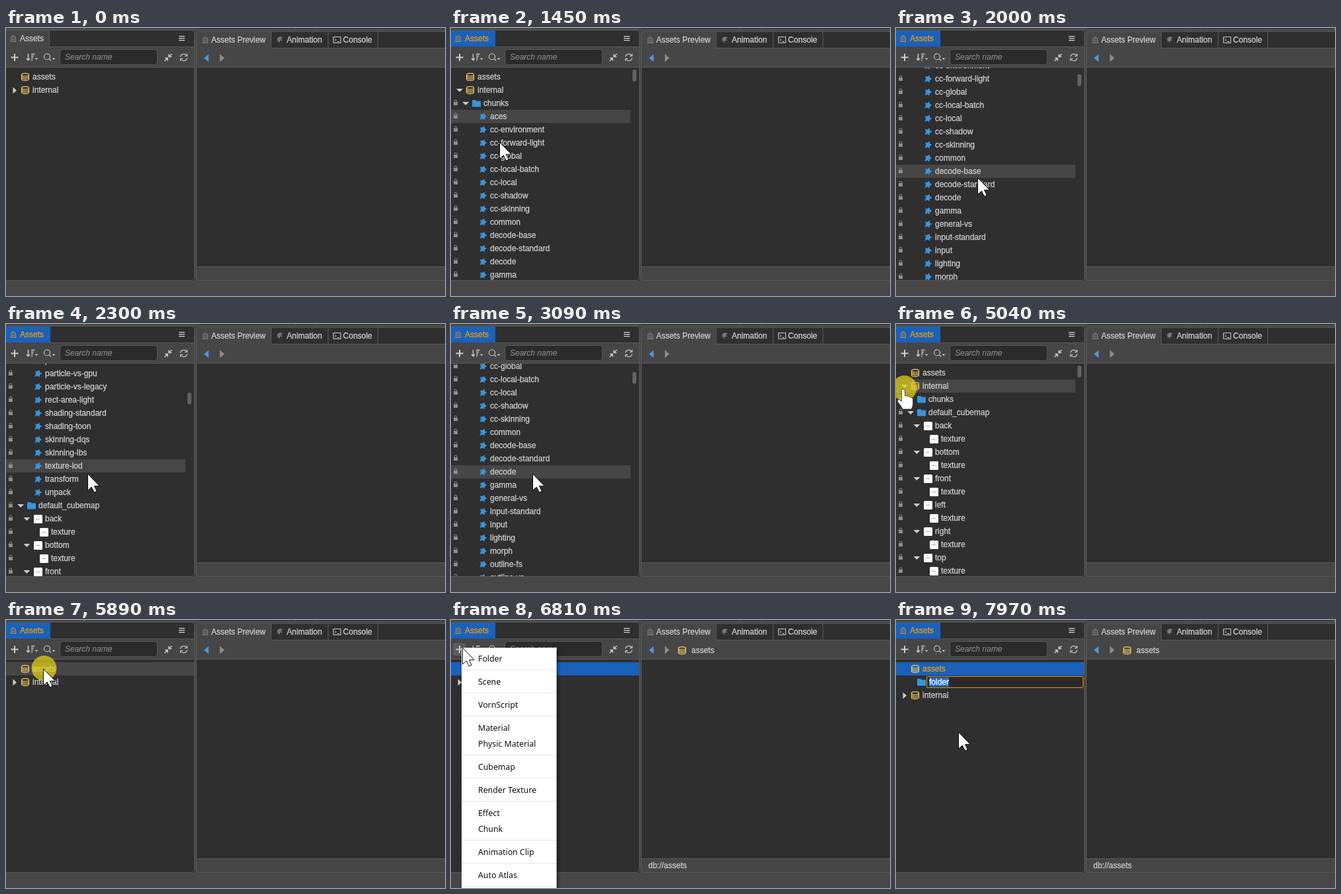
Animation of 663 by 406 pixels, one loop 8000 ms. Source, as an HTML page with a canvas:

```html
<!DOCTYPE html>
<html lang="en">
<head>
<meta charset="utf-8">
<title>Asset panel</title>
<style>
html, body { margin: 0; width: 100%; height: 100%; overflow: hidden; background: #474747; }
canvas { display: block; }
</style>
</head>
<body>
<canvas id="stage" width="663" height="406"></canvas>
<script>
const g = document.getElementById('stage').getContext('2d');
const UI = '12px "Liberation Sans", Arial, sans-serif';
const MENU = '12.3px "Noto Sans", sans-serif';
const DARK = '#2f2f2f', BAR = '#464646', EDGE = '#595959', TEXT = '#cccccc', DIM = '#858585';
const BLUE = '#1961ba', ORANGE = '#f49b0b', SKY = '#3794dc', GOLD = '#f0c85a';
const LOOP = 8000, STEP = 76.86, HOVER_LAG = 120, ROW = 20;

// Mouse presses: down and up, in ms. The effect of each follows on release.
const press = {
  expand: [1050, 1200], foldChunks: [3950, 4180], collapse: [5040, 5190],
  select: [5880, 6035], plus: [6730, 6800], folder: [7660, 7730]
};
const RENAME = 7880;
const after = (name, t) => t >= press[name][1];

// Moves: start, end, then the place reached.
const pointerMoves = [
  [0, 0, 245, 298], [130, 290, 26, 171], [400, 500, 30, 92], [510, 670, 18, 91], [820, 900, 14, 90],
  [1257, 1437, 73, 173], [1440, 1550, 123, 227], [3250, 3560, 18, 115], [4430, 4550, 11, 98],
  [5430, 5760, 56, 74], [6110, 6440, 17, 42], [7000, 7400, 70, 55], [7700, 7960, 94, 170]
];
const scrollMoves = [[0, 0, 0], [1930, 2530, 674], [2870, 3192, 0]];

const shaders = ('aces cc-environment cc-forward-light cc-global cc-local-batch cc-local cc-shadow cc-skinning ' +
  'common decode-base decode-standard decode gamma general-vs input-standard input lighting morph outline-fs ' +
  'outline-vs output-standard output packing particle-common particle-trail particle-vs-gpu particle-vs-legacy ' +
  'rect-area-light shading-standard shading-toon skinning-dqs skinning-lbs texture-lod transform unpack').split(' ');
const sides = ['back', 'bottom', 'front', 'left', 'right', 'top'];
const menuGroups = [['Folder'], ['Scene'], ['VornScript'], ['Material', 'Physic Material'], ['Cubemap'],
  ['Render Texture'], ['Effect', 'Chunk'], ['Animation Clip'], ['Auto Atlas']];

const within = (t, a, b) => t >= a && t < b;
const snap = t => 130 + Math.floor((t - 120) / STEP) * STEP;

function follow(moves, t) {
  let place = moves[0].slice(2);
  for (const [from, to, ...target] of moves) {
    if (t < from) break;
    const left = t < to ? (1 - (t - from) / (to - from)) ** 2 : 0;
    place = target.map((v, i) => v + (place[i] - v) * left);
  }
  return place;
}
const pointerAt = t => follow(pointerMoves, t);
const pointerShown = t => within(t, 130, 350) || t >= 505;

function box(x, y, w, h, color) {
  g.fillStyle = color;
  g.fillRect(x, y, w, h);
}
function round(x, y, w, h, r, fill, stroke) {
  g.beginPath();
  g.roundRect(x, y, w, h, r);
  if (fill) { g.fillStyle = fill; g.fill(); }
  if (stroke) { g.strokeStyle = stroke; g.lineWidth = 1; g.stroke(); }
}
function draw(x, y, d, fill, stroke, width = 1) {
  const path = new Path2D(d);
  g.save();
  g.translate(x, y);
  if (fill) { g.fillStyle = fill; g.fill(path); }
  if (stroke) { g.strokeStyle = stroke; g.lineWidth = width; g.stroke(path); }
  g.restore();
}
const trace = (x, y, d, color, width) => draw(x, y, d, null, color, width);

// A hairline stroke gives the panel text its slightly heavier weight.
function label(s, x, y, color = TEXT, font = UI, weight = 0.3) {
  g.font = font;
  g.fillStyle = g.strokeStyle = color;
  g.lineWidth = weight;
  g.fillText(s, x, y);
  if (weight) g.strokeText(s, x, y);
}

const icons = {
  db(x, y) {
    trace(x, y, 'M-5.5-3.2a5.5 2.2 0 1 0 11 0a5.5 2.2 0 1 0-11 0V3.4a5.5 2.2 0 0 0 11 0V-3.2' +
      'M-5.5-1a5.5 2.2 0 0 0 11 0M-5.5 1.2a5.5 2.2 0 0 0 11 0', GOLD, 1.1);
  },
  folder(x, y) {
    round(x - 6, y - 5, 6, 5, 1, SKY);
    round(x - 6, y - 3.5, 13, 9, 1, SKY);
  },
  shader(x, y) {
    g.beginPath();
    for (let i = 0; i < 10; i++) {
      const a = i * Math.PI / 5 - 1.25, r = i % 2 ? 3.3 : 5.8;
      g.lineTo(x + 0.5 + r * Math.cos(a), y + r * Math.sin(a));
    }
    g.fillStyle = SKY;
    g.fill();
    draw(x, y, 'M-2 1L-5 5.5L0 3Z', SKY);
  },
  image(x, y) {
    round(x - 6, y - 6, 13, 13, 1.5, '#fff');
    box(x - 3, y, 6, 1, '#aaa');
  },
  panel(x, y, color) {
    trace(x, y, 'M-2-4.5H2M-3.5-2.5H3.5V4.5H-3.5ZM-4.5 4.5H4.5M-1.2-1V3.5M1.2-1V3.5', color);
  },
  lock(x, y) {
    box(x - 3, y - 1, 6, 5, '#8e8e8e');
    trace(x, y, 'M-1.8-1V-2.2a1.8 1.8 0 0 1 3.6 0V-1', '#8e8e8e');
  }
};
const caretDown = (x, y, s = 5) => draw(x, y, `M${-s} ${-s / 2}H${s}L0 ${s / 2}Z`, TEXT);
const caretRight = (x, y) => draw(x, y, 'M-2.5-5L3 0L-2.5 5Z', TEXT);

function listRows(t) {
  const rows = [], add = (name, depth, icon, open, locked = true) => rows.push({ name, depth, icon, open, locked });
  const open = after('expand', t) && !after('collapse', t), chunksOpen = !after('foldChunks', t);
  add('assets', 0, 'db', undefined, false);
  if (t >= RENAME) add('folder', 1, 'folder', undefined, false);
  add('internal', 0, 'db', open, false);
  if (!open) return rows;
  add('chunks', 1, 'folder', chunksOpen);
  if (chunksOpen) shaders.forEach(s => add(s, 2, 'shader'));
  add('default_cubemap', 1, 'folder', true);
  for (const s of sides) {
    add(s, 2, 'image', true);
    add('texture', 3, 'image');
  }
  add('default_file_content', 1, 'folder', false);
  return rows;
}

function drawList(t) {
  const rows = listRows(t), [scroll] = follow(scrollMoves, t), scrollable = rows.length > 15;
  const lagged = t - HOVER_LAG, hovering = pointerShown(lagged) && t < press.plus[0];
  const hover = hovering ? Math.floor((pointerAt(lagged)[1] - 67 + scroll) / ROW) : -1;
  g.save();
  g.beginPath();
  g.rect(0, 60, 284, 322);
  g.clip();
  rows.forEach((row, i) => {
    const y = Math.round(74 + ROW * i - scroll), x = Math.round(40 + 9.3 * row.depth);
    const active = i === 0 && after('select', t);
    if (active) box(0, y - 10, 284, ROW, BLUE);
    else if (i === hover) box(0, y - 10, scrollable ? 271 : 284, ROW, BAR);
    if (row.locked) icons.lock(7, y - 1);
    if (row.open !== undefined) (row.open ? caretDown : caretRight)(13 + 9.2 * row.depth, y + 0.5);
    icons[row.icon](x - 11, y);
    if (row.name === 'folder') {
      round(46.5, y - 8.5, 236, 17, 1.5, '#2a2a2a', ORANGE);
      box(50, y - 7, 30, 14, '#1f6fd0');
      label('folder', 50, y + 4, '#fff');
    } else label(row.name, x, y + 4, active ? ORANGE : TEXT);
  });
  if (scrollable) round(274, 63 + scroll * 0.073, 6, 18, 3, '#626262');
  g.restore();
}

function drawLeft(t) {
  const focused = t >= press.expand[0];
  box(0, 3, 285, 380, DARK);
  box(0, 28, 284, 32, BAR);
  for (const y of [3, 28, 59]) box(0, y, 284, 1, EDGE);
  box(0, 4, 66, 25, BAR);
  box(65, 4, 1, 24, EDGE);
  if (focused) box(0, 4, 67, 24, BLUE);
  icons.panel(11, 16, focused ? '#bd8a45' : DIM);
  label('Assets', 21, 20, focused ? ORANGE : TEXT);
  for (let y = 12; y < 20; y += 3) box(261, y, 9, 1.3, TEXT);

  if (t >= press.plus[0] && !after('folder', t)) round(3, 35, 20, 19, 3, '#5c5c5c');
  trace(13, 44.5, 'M-5.5 0H5.5M0-5.5V5.5', TEXT, 2);
  trace(37, 44, 'M-3.5-5V4.5M-6 2L-3.5 5L-1 2M1-4.5H6.5M1-1.5H5M1 1.5H4M1 4.5H3', TEXT, 1.4);
  trace(62, 43.5, 'M-4.5 0a4.5 4.5 0 1 0 9 0a4.5 4.5 0 1 0-9 0M3.2 3.2L6 6', TEXT, 1.2);
  for (const x of [46, 72]) caretDown(x, 47, 2.5);
  round(81.5, 32.5, 147, 23, 4, '#2b2b2b', EDGE);
  label('Search name', 89, 48, DIM, 'italic ' + UI, 0.2);
  trace(245, 44.5, 'M5.5-5.5L1.5-1.5M1-5V-1H5M-5.5 5.5L-1.5 1.5M-1 5V1H-5', TEXT, 1.5);
  trace(268.5, 44.5, 'M-5-1A5 5 0 0 1 4-3M5-5.5V-2H1.5M5 1A5 5 0 0 1-4 3M-5 5.5V2H-1.5', TEXT, 1.2);
  drawList(t);
  round(-5.5, 3.5, 290, 379, 4, null, EDGE);
}

function drawRight(t) {
  box(288, 6, 375, 376, DARK);
  box(288, 6, 113, 25, BAR);
  box(288, 31, 375, 29, BAR);
  box(288, 361, 375, 21, BAR);
  box(401, 30, 262, 1, EDGE);
  for (const y of [59, 361]) box(288, y, 375, 1, EDGE);
  for (const x of [400, 486, 561]) box(x, 6, 1, 24, EDGE);
  round(287.5, 5.5, 390, 377, 4, null, EDGE);
  icons.panel(301, 18, DIM);
  label('Assets Preview', 310, 22);
  draw(413, 18, 'M-4-2L0-5L5-4L2-1L5 1H1L0 5L-2 1L-4 4L-3 0Z', '#777');
  label('Animation', 424, 22);
  trace(500, 18, 'M-5.5-4.5H5.5V4.5H-5.5ZM-3.5-2L-1.5 0L-3.5 2M0 2.5H3.5', TEXT);
  label('Console', 509, 22);
  draw(303, 45.5, 'M3-6L-4 0L3 6Z', '#4a96df');
  draw(326, 45.5, 'M-3-6L4 0L-3 6Z', '#8a8a8a');
  if (after('select', t)) {
    icons.db(349, 46);
    label('assets', 363, 50);
    label('db://assets', 298, 376);
  }
}

function drawMenu(t) {
  if (!after('plus', t) || after('folder', t)) return;
  g.save();
  g.shadowColor = 'rgba(0,0,0,.5)';
  g.shadowBlur = 4;
  g.shadowOffsetX = g.shadowOffsetY = 2;
  box(16, 42, 143.5, 380, '#fff');
  g.restore();
  if (pointerAt(t)[1] > 47) box(17, 47, 142, 24, '#e9e9e9');
  let y = 59;
  for (const group of menuGroups) {
    for (const name of group) {
      label(name, 41, y + 4, '#111', MENU, 0);
      y += 24;
    }
    box(17, y - 8, 142, 1, '#e6e6e6');
    y += 11;
  }
}

function drawPointer(t) {
  if (!pointerShown(t)) return;
  const [x, y] = pointerAt(t), overCaret = x < 24 && within(y, 85, 120);
  if (Object.values(press).some(([down, up]) => within(t, down, up))) {
    g.beginPath();
    g.arc(x + 1.5, y - 1, 19, 0, 7);
    g.fillStyle = 'rgba(232,214,22,.7)';
    g.fill();
  }
  if (overCaret) {
    draw(x, y, 'M-2.5 2.5Q0-1.5 2.5 2.5V11Q5 9.5 7 12Q9.5 11 11 13.5Q14.5 13 14.5 17V24' +
      'Q14 28 12 31H-1Q-3 26-8 20.5Q-10 17-6.5 16.5L-2.5 19Z', '#fff', '#333', 0.8);
  } else {
    draw(x + 0.5, y, 'M0 0V25L5.7 20L9.8 28L13.6 26.3L9.8 18.4H17.6Z', '#fff', '#111');
  }
}

function drawBackdrop() {
  box(0, 0, 663, 406, '#474747');
  box(0, 0, 284, 1, '#393939');
  box(0, 1, 284, 1, EDGE);
  box(288, 0, 375, 2, '#393939');
  box(288, 2, 375, 1, EDGE);
  for (const x of [58, 118, 437, 469]) box(x, 0, 1, 2, EDGE);
}

const start = performance.now();
(function tick() {
  const t = snap((performance.now() - start) % LOOP);
  drawBackdrop();
  drawLeft(t);
  drawRight(t);
  drawMenu(t);
  drawPointer(t);
  requestAnimationFrame(tick);
})();
</script>
</body>
</html>
```
